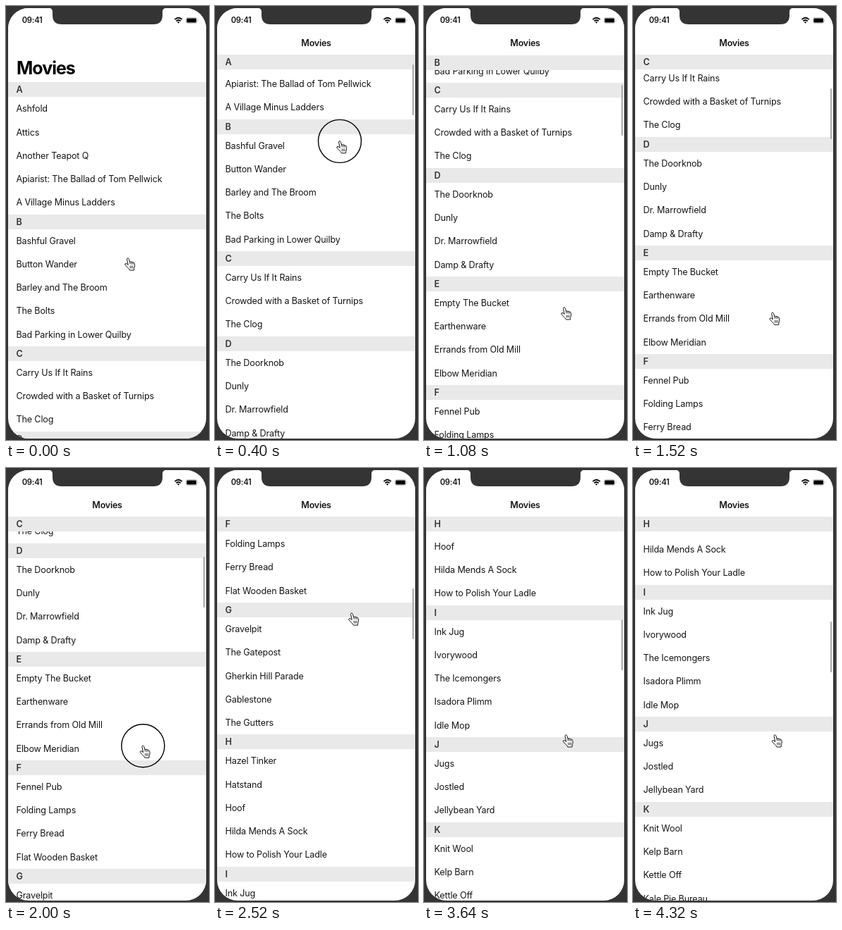
These frames come from a looping animation (288x616 px, 4.36 s). An HTML page:

```html
<!DOCTYPE html>
<html lang="en">
<head>
<meta charset="utf-8">
<title>Movies</title>
<style>
html, body { margin: 0; width: 100%; height: 100%; overflow: hidden; background: #343434; }
body { position: relative; font: 12.6px Inter, "Liberation Sans", sans-serif; letter-spacing: -.15px; color: #161616; }
#screen, #list, svg { position: absolute; left: 0; top: 0; width: 288px; height: 616px; }
#screen { background: #fff; clip-path: inset(3px 4px 2px 3px round 29px); }
#list { overflow: hidden; padding-top: 108.2px; box-sizing: border-box; }
h1 { position: absolute; left: 15px; top: 72px; margin: 0; font-size: 25px; line-height: 32px; letter-spacing: -1px; color: #000; }
/* The sticky offset counts from the list's padding edge: 69.3 - 108.2 */
h2 { position: sticky; top: -38.9px; margin: 0; padding-left: 14.5px; font-size: 12.6px; font-weight: 600;
  line-height: 21.15px; height: 21.15px; background: #e9e9e9; color: #333; }
p { margin: 0; padding-left: 14.5px; height: 33.24px; line-height: 33.24px; white-space: nowrap; }
#nav { position: absolute; left: 0; top: 0; width: 287px; height: 69.3px; background: #fff; }
#title { position: absolute; top: 45px; width: 100%; line-height: 16px; text-align: center; font-weight: 600; letter-spacing: -.3px; }
#clock { position: absolute; left: 22.7px; top: 13px; font-size: 11.2px; line-height: 15px; font-weight: 600; letter-spacing: -.2px; }
#bar { position: absolute; left: 279.6px; width: 2.4px; height: 72px; border-radius: 2px; background: #a9a9a9; }
</style>
</head>
<body>
<div id="screen">
  <div id="list"><h1>Movies</h1></div>
  <div id="nav"><div id="clock">09:41</div><div id="title">Movies</div></div>
  <div id="bar"></div>
</div>
<svg viewBox="0 0 288 616">
  <path fill="#343434" d="M60 0V2.5Q66 3 66 8V13Q66 26 79 26H209Q222 26 222 13V8Q222 3 228 2.5V0Z"/>
  <g fill="none" stroke="#000" stroke-width="1.8">
    <path d="M239.4 19.2Q244.6 14.4 249.8 19.2M241.4 21.4Q244.6 18.6 247.8 21.4"/>
  </g>
  <path d="M242.9 22.8Q244.6 21.6 246.3 22.8L244.6 24.7Z"/>
  <rect x="255.4" y="16.5" width="15.6" height="8" rx="2.2" fill="none" stroke="#aaa" stroke-width=".7"/>
  <rect x="256.4" y="17.5" width="13.6" height="6" rx="1.2"/>
  <path d="M271.9 19.2Q273.2 20.5 271.9 21.8Z" fill="#777"/>
  <g id="pointer">
    <circle id="touch" r="30.5" fill="none" stroke="#000" stroke-width="1.4"/>
    <g transform="translate(-5 -1)" stroke="#111" stroke-linejoin="round" stroke-linecap="round">
      <path fill="#fff" d="M3.6 2Q3.8 .6 5.1 .8Q6.1 1 6.5 2.4L7.6 6.4Q8.4 5.4 9.7 6.3Q11 5.6 11.9 7Q13.6 6.6 14.2 8.2Q15.2 11 14.3 13.5Q13.5 15.5 13.6 18H7.5Q6.8 16 4.3 14Q2.2 12 .9 10.2Q.5 8.6 2 8.5Q3.6 8.7 5 10.2Z"/>
      <path fill="none" stroke-width=".8" d="M7.6 6.4L8 9M9.7 6.5L10 9.2M11.9 7.1L12.1 9.6M8.2 12V15M10.1 12V15M12 12V15"/>
    </g>
  </g>
</svg>
<script>
const sections = {
  A: 'Ashfold|Attics|Another Teapot Q|Apiarist: The Ballad of Tom Pellwick|A Village Minus Ladders',
  B: 'Bashful Gravel|Button Wander|Barley and The Broom|The Bolts|Bad Parking in Lower Quilby',
  C: 'Carry Us If It Rains|Crowded with a Basket of Turnips|The Clog',
  D: 'The Doorknob|Dunly|Dr. Marrowfield|Damp & Drafty',
  E: 'Empty The Bucket|Earthenware|Errands from Old Mill|Elbow Meridian',
  F: 'Fennel Pub|Folding Lamps|Ferry Bread|Flat Wooden Basket',
  G: 'Gravelpit|The Gatepost|Gherkin Hill Parade|Gablestone|The Gutters',
  H: 'Hazel Tinker|Hatstand|Hoof|Hilda Mends A Sock|How to Polish Your Ladle',
  I: 'Ink Jug|Ivorywood|The Icemongers|Isadora Plimm|Idle Mop',
  J: 'Jugs|Jostled|Jellybean Yard',
  K: 'Knit Wool|Kelp Barn|Kettle Off|Kale Pie Bureau|Kiosk Garden'
};
const $ = id => document.getElementById(id);
const add = (parent, tag, text = '') => {
  const el = parent.appendChild(document.createElement(tag));
  el.textContent = text;
  return el;
};
for (const letter in sections) {
  const section = add($('list'), 'section');
  add(section, 'h2', letter);
  sections[letter].split('|').forEach(name => add(section, 'p', name));
}

const LOOP = 4360, TAU = 470;
const DRAGS = [[160, 420], [1794, 2360]];
const clamp = v => Math.max(0, Math.min(1, v));
const mix = (a, b, k) => a + (b - a) * k;
const ease = (t, from, to) => { const k = clamp((t - from) / (to - from)); return k * k * (3 - 2 * k); };

// Free scrolling slows down exponentially towards its end
const coast = (t, end, reach, start) => end - reach * Math.exp((start - t) / TAU);
const coast1 = t => coast(t, 447.5, 297, 420);
const coast2 = t => coast(t, 1284.4, 175, 2920);
const drag = (t, [from, to], a, b) => mix(a, b, ((t - from) / (to - from)) ** 1.42);

function scrollAt(t) {
  const [d1, d2] = DRAGS;
  if (t < d1[0]) return 0;
  if (t < d1[1]) return drag(t, d1, 0, coast1(d1[1]));
  if (t < d2[0]) return coast1(t);
  if (t < d2[1]) return drag(t, d2, coast1(d2[0]), coast2(d2[1]));
  return coast2(t);
}

function pointerAt(t, s) {
  const [d1, d2] = DRAGS, grab = scrollAt(d2[0]);
  if (t < d1[0]) return [mix(173, 174, t / d1[0]), mix(358, 327, ease(t, 0, d1[0]))];
  if (t < d1[1]) return [mix(174, 177, ease(t, d1[0], 400)), 327 - s];
  if (t < d2[0]) {
    const back = ease(t, 500, 1040), settle = ease(t, 1400, d2[0]);
    return [mix(177, 199, back) - 4 * settle, mix(177, 428, back) + 32.6 * settle];
  }
  if (t < d2[1]) return [mix(195, 193, ease(t, ...d2)), 460.6 - (s - grab)];
  const rest = ease(t, 2420, 2900);
  return [mix(193, 201.5, rest), mix(460.6 - (scrollAt(d2[1]) - grab), 379, rest)];
}

function draw() {
  const t = performance.now() % LOOP, s = scrollAt(t);
  const [x, y] = pointerAt(t, s);
  $('list').scrollTop = s;
  $('title').style.opacity = clamp((s - 28) / 12);
  $('bar').style.opacity = clamp(s / 8);
  $('bar').style.top = 83 + (s - 134) * .1187 + 'px';
  $('pointer').setAttribute('transform', `translate(${x} ${y})`);
  $('touch').style.opacity = DRAGS.some(([from, to]) => t >= from && t < to) ? 1 : 0;
  requestAnimationFrame(draw);
}
draw();
</script>
</body>
</html>
```
